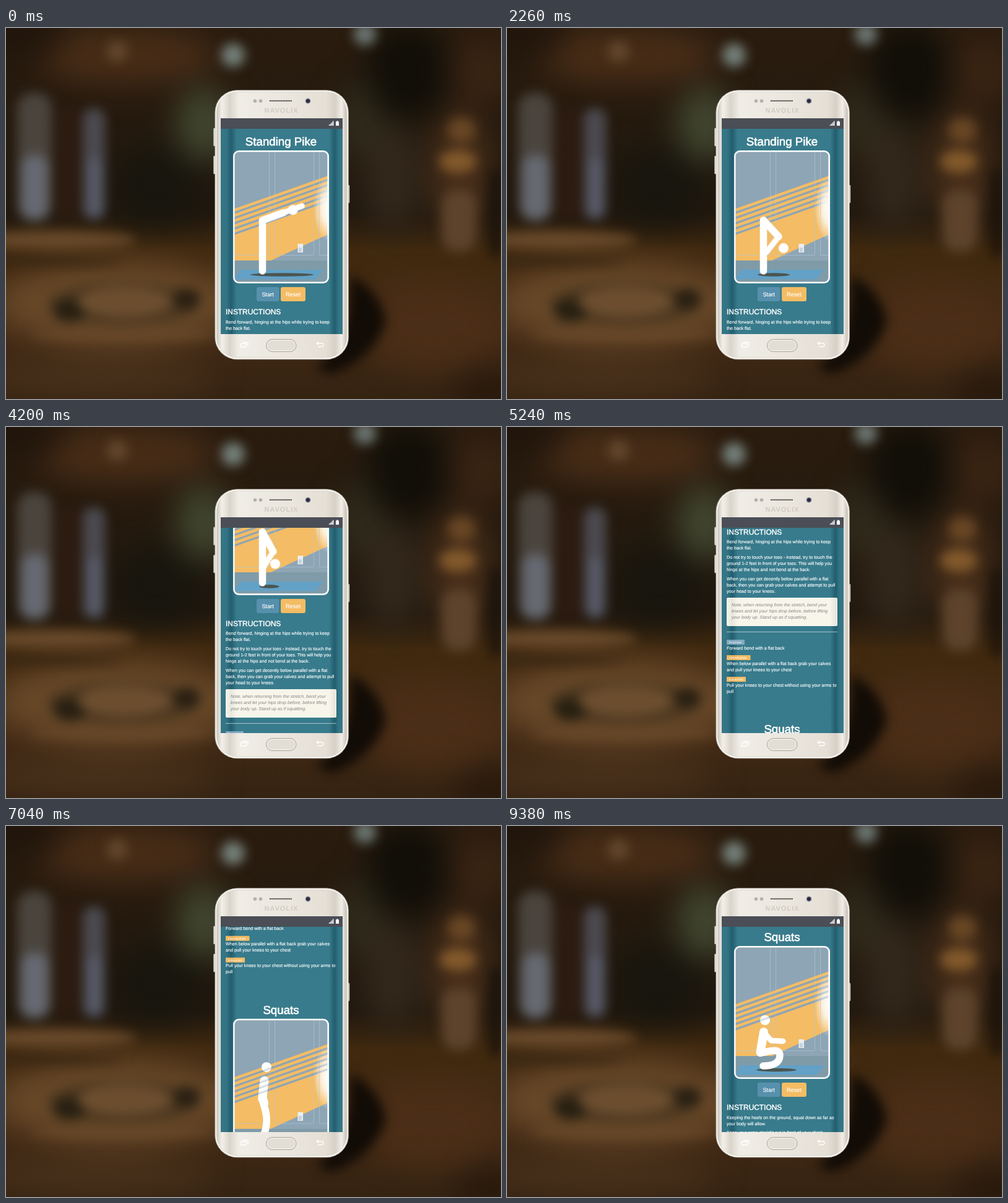
Write an HTML page that moves like this. It is 800x600 px and loops after 9420 ms.

```html
<!DOCTYPE html>
<html lang="en">
<head>
<meta charset="utf-8">
<title>Stretching app on a phone</title>
<style>
html, body { margin: 0; width: 100%; height: 100%; overflow: hidden; background: #2b1c0f; }
svg { display: block; width: 800px; height: 600px; }
text { font-family: "Liberation Sans", Arial, sans-serif; fill: #fff; text-rendering: geometricPrecision; }
.title { font-size: 18.7px; text-anchor: middle; stroke: #fff; stroke-width: .65; }
.heading { font-size: 11.9px; stroke: #fff; stroke-width: .45; }
.copy text { font-size: 7.17px; stroke: #fff; stroke-width: .15; }
.copy .note { font-style: italic; fill: #858580; stroke: none; }
.copy .badge { font-size: 5.2px; stroke: none; }
.button { font-size: 9.2px; text-anchor: middle; stroke: #fff; stroke-width: .15; }
.limb { fill: none; stroke: #fff; stroke-width: 11.5; stroke-linecap: round; stroke-linejoin: round; }
.arm { stroke-width: 9; }
.back { stroke-width: 14; }
.shadow { fill: #4b5552; }

.page, .turn, .shadow, .squat * { animation: 9420ms linear infinite; }
.page { animation-name: scroll; }
.torso { animation-name: bend; }
.reach { animation-name: reach; }
.nod { animation-name: nod; }
.pike-shadow { animation-name: pike-shadow; }
.squat-shadow { animation-name: squat-shadow; }
.squat .head { animation-name: squat-head; }
.squat .back { animation-name: squat-back; }
.squat .arm { animation-name: squat-arm; }
.squat .leg { animation-name: squat-leg; }

@keyframes scroll {
  0%, 31.5% { transform: translateY(0); }
  44.59% { transform: translateY(-141px); }
  55.63% { transform: translateY(-289px); }
  66.45% { transform: translateY(-398px); }
  84.29%, 85.14% { transform: translateY(-575px); }
  89.5%, 100% { transform: translateY(-598px); }
}
@keyframes bend {
  0% { transform: rotate(-20deg); }
  10.4% { transform: rotate(-2deg); }
  24% { transform: rotate(47deg); }
  31%, 100% { transform: rotate(61deg); }
}
@keyframes reach {
  0% { transform: rotate(0deg); }
  10.4% { transform: rotate(42deg); }
  24% { transform: rotate(81deg); }
  31%, 100% { transform: rotate(61deg); }
}
@keyframes nod {
  0% { transform: translate(52px, 1px); }
  24%, 100% { transform: translate(55px, 7px); }
}
@keyframes pike-shadow {
  0% { cx: 446px; rx: 51px; }
  10.4% { cx: 442px; rx: 44px; }
  24% { cx: 431px; rx: 26px; }
  31%, 100% { cx: 425.5px; rx: 16px; }
}
@keyframes squat-shadow {
  0%, 66.45% { cx: 427px; rx: 18px; }
  84.29%, 85.14% { cx: 429px; rx: 21px; }
  99.58%, 100% { cx: 435.5px; rx: 32.5px; }
}
@keyframes squat-head {
  0%, 66.45% { cx: 427px; cy: 272px; }
  84.29%, 85.14% { cx: 414px; cy: 281px; }
  93.42% { cx: 414px; cy: 291px; }
  99.58%, 100% { cx: 417px; cy: 318px; }
}
@keyframes squat-back {
  0%, 66.45% { d: path("M421 294L416 325"); }
  84.29%, 85.14% { d: path("M413.5 302L412 331"); }
  93.42% { d: path("M413 310L410 342"); }
  99.58%, 100% { d: path("M415 337L409.5 370"); }
}
@keyframes squat-arm {
  0%, 66.45% { d: path("M420 297L417 318L416 332"); }
  84.29%, 85.14% { d: path("M413 303L416 328L424 339"); }
  93.42% { d: path("M413 312L419 333L435 344"); }
  99.58%, 100% { d: path("M415 338L427 351L446 352"); }
}
@keyframes squat-leg {
  0%, 66.45% { d: path("M416 325C418 339 419 349 419 360C419 372 417 384 413 393"); }
  84.29%, 85.14% { d: path("M411 331C418 343 424 352 424 364C424 376 420 384 413 393"); }
  93.42% { d: path("M410 342C420 349 430 356 430 369C430 381 423 387 413 392"); }
  99.58%, 100% { d: path("M409 371C420 370 441 361 441 375C441 388 428 392 414 392"); }
}
</style>
</head>
<body>
<svg viewBox="0 0 800 600">
  <defs>
    <filter id="soft" filterUnits="userSpaceOnUse" x="-100" y="-100" width="1000" height="800" color-interpolation-filters="sRGB"><feGaussianBlur stdDeviation="9"/></filter>
    <filter id="haze" filterUnits="userSpaceOnUse" x="-200" y="-200" width="1200" height="1000" color-interpolation-filters="sRGB"><feGaussianBlur stdDeviation="24"/></filter>
    <linearGradient id="room" x2="0" y2="1">
      <stop offset="0" stop-color="#2a1c0f"/><stop offset=".5" stop-color="#21180e"/>
      <stop offset=".6" stop-color="#40290f"/><stop offset=".8" stop-color="#432a15"/>
      <stop offset="1" stop-color="#352312"/>
    </linearGradient>
    <linearGradient id="shell">
      <stop offset="0" stop-color="#cbc6bc"/><stop offset=".04" stop-color="#f3f0e9"/>
      <stop offset=".1" stop-color="#dad5cb"/><stop offset=".17" stop-color="#f0ede6"/>
      <stop offset=".5" stop-color="#ebe7df"/><stop offset=".84" stop-color="#e5dfd5"/>
      <stop offset=".91" stop-color="#d6d0c6"/><stop offset=".96" stop-color="#f1eee7"/>
      <stop offset="1" stop-color="#c5bfb5"/>
    </linearGradient>
    <linearGradient id="curve">
      <stop offset="0" stop-color="#003040" stop-opacity=".04"/>
      <stop offset=".05" stop-color="#003040" stop-opacity=".08"/>
      <stop offset=".085" stop-color="#003040" stop-opacity=".34"/>
      <stop offset=".13" stop-color="#003040" stop-opacity="0"/>
      <stop offset=".89" stop-color="#003040" stop-opacity="0"/>
      <stop offset=".935" stop-color="#003040" stop-opacity=".34"/>
      <stop offset=".965" stop-color="#003040" stop-opacity=".08"/>
      <stop offset="1" stop-color="#003040" stop-opacity=".04"/>
    </linearGradient>
    <radialGradient id="glow">
      <stop offset="0" stop-color="#fff"/><stop offset=".45" stop-color="#fff" stop-opacity=".8"/>
      <stop offset="1" stop-color="#fff" stop-opacity="0"/>
    </radialGradient>
    <clipPath id="view"><path d="M347 163H544V495H347z"/></clipPath>
    <clipPath id="frame"><rect x="368" y="199" width="153" height="213" rx="8"/></clipPath>

    <path id="stripe" d="M366 299.9L524 244.2"/>
    <g id="stripes" fill="none" stroke="#8ea5b5" stroke-width="3.2">
      <use href="#stripe"/><use href="#stripe" y="8.5"/><use href="#stripe" y="17"/>
      <use href="#stripe" y="25.5"/><use href="#stripe" y="34"/>
    </g>
    <g id="gym">
      <path d="M367 198H522V413H367z" fill="#8ea5b5"/>
      <path d="M367 376H522V413H367z" fill="#809ba8"/>
      <path d="M367 293.1L522 238.3V333L428 376H367z" fill="#f4bc64"/>
      <use href="#stripes"/>
      <ellipse cx="521" cy="292" rx="24" ry="53" fill="url(#glow)"/>
      <path d="M425.5 200V367M434.5 200V367M497.5 200V367M506.5 200V367M369 367.5H425M434 367.5H497M506 367.5H521" fill="none" stroke="#a9cbdc" stroke-width=".8" opacity=".75"/>
      <path d="M471.5 349H480V363H471.5z" fill="#e9eef0"/>
      <path d="M473 355H478V362H473z" fill="#c5d3dc"/>
      <path d="M378 391H513L500 406.5H369z" fill="#63a1c6"/>
    </g>
    <g id="controls">
      <rect x="368.3" y="199.3" width="152.4" height="212.4" rx="8" fill="none" stroke="#fff" stroke-width="2.6"/>
      <rect x="405" y="419" width="36.5" height="23" rx="3" fill="#5790ad"/>
      <rect x="444" y="419" width="40" height="23" rx="3" fill="#f4bc64"/>
      <text class="button" x="423.2" y="433.6">Start</text>
      <text class="button" x="464" y="433.6">Reset</text>
      <text class="heading" x="355" y="462.8">INSTRUCTIONS</text>
    </g>
  </defs>

  <path d="M0 0H800V600H0z" fill="url(#room)"/>
  <g filter="url(#haze)">
    <ellipse cx="190" cy="45" rx="150" ry="45" fill="#482d17"/>
    <ellipse cx="15" cy="10" rx="80" ry="50" fill="#22160c"/>
    <ellipse cx="320" cy="155" rx="45" ry="60" fill="#414630"/>
    <ellipse cx="245" cy="255" rx="75" ry="65" fill="#18160e"/>
    <ellipse cx="570" cy="150" rx="35" ry="60" fill="#2f2b1c"/>
    <ellipse cx="650" cy="70" rx="65" ry="80" fill="#110f08"/>
    <ellipse cx="770" cy="70" rx="50" ry="50" fill="#3a2413"/>
    <ellipse cx="625" cy="240" rx="45" ry="90" fill="#33281c"/>
    <ellipse cx="735" cy="230" rx="45" ry="100" fill="#4a301b"/>
    <ellipse cx="180" cy="445" rx="200" ry="70" fill="#674828"/>
    <ellipse cx="690" cy="480" rx="120" ry="70" fill="#4b2e17"/>
    <ellipse cx="150" cy="565" rx="190" ry="28" fill="#4a321c"/>
    <ellipse cx="790" cy="590" rx="70" ry="40" fill="#291a0d"/>
  </g>
  <g filter="url(#soft)">
    <rect x="18" y="105" width="56" height="208" rx="24" fill="#4a443d"/>
    <rect x="25" y="205" width="43" height="104" rx="20" fill="#666972"/>
    <path d="M80 125H120V310H80z" fill="#2c1b10"/>
    <rect x="124" y="130" width="36" height="180" rx="16" fill="#4c4a50"/>
    <rect x="132" y="210" width="22" height="95" rx="10" fill="#575b69"/>
    <circle cx="367" cy="44" r="19" fill="#74807a"/>
    <circle cx="580" cy="10" r="18" fill="#6b7672"/>
    <circle cx="180" cy="38" r="17" fill="#62472d"/>
    <ellipse cx="736" cy="165" rx="22" ry="20" fill="#684624"/>
    <ellipse cx="730" cy="216" rx="30" ry="18" fill="#82592b"/>
    <rect x="704" y="262" width="56" height="100" rx="24" fill="#5d432c"/>
    <path d="M783 230H800V370H783z" fill="#1b120a"/>
    <ellipse cx="80" cy="343" rx="130" ry="15" fill="#68492a"/>
    <ellipse cx="60" cy="378" rx="130" ry="7" fill="#3a2714"/>
    <ellipse cx="190" cy="446" rx="122" ry="34" fill="#4b371f"/>
    <ellipse cx="103" cy="457" rx="27" ry="19" fill="#282012"/>
    <ellipse cx="292" cy="438" rx="22" ry="17" fill="#2a2013"/>
    <ellipse cx="192" cy="443" rx="76" ry="25" fill="#6c4e2f"/>
    <ellipse cx="190" cy="494" rx="150" ry="12" fill="#664728"/>
    <path d="M556 400Q606 425 614 475Q595 535 525 560L500 548Q560 510 556 400" fill="#120c06"/>
  </g>

  <g fill="#eeeae2" stroke="#a9a49b" stroke-width=".5">
    <rect x="335.5" y="162" width="4" height="29" rx="1"/>
    <rect x="335.5" y="207" width="4" height="29" rx="1"/>
    <rect x="551.5" y="254" width="3.5" height="29" rx="1"/>
  </g>
  <rect x="337.5" y="100.3" width="216.3" height="436" rx="36" fill="#b8b3aa"/>
  <rect x="338.5" y="101.3" width="214.3" height="434" rx="35" fill="#faf8f3"/>
  <rect x="340.5" y="103.5" width="210.3" height="429.5" rx="33" fill="url(#shell)" stroke="#cfcac1" stroke-width=".6"/>
  <g fill="#b4b0aa"><circle cx="402.5" cy="118" r="2.8"/><circle cx="411.5" cy="118" r="2.8"/></g>
  <path d="M427 117.8H463" stroke="#413e3a" stroke-width="2.3" stroke-linecap="round" stroke-dasharray="0 2.6"/>
  <circle cx="488" cy="118" r="4.3" fill="#777480"/><circle cx="488" cy="118" r="2.8" fill="#252743"/>
  <text x="445" y="137" text-anchor="middle" font-size="11" font-weight="700" letter-spacing="1" style="fill:#d0cbc2">NAVOLIX</text>
  <rect x="420.5" y="503.5" width="48.5" height="20" rx="10" fill="#e3ded5" stroke="#aaa59c"/>
  <rect x="422" y="505" width="45.5" height="17" rx="8.5" fill="none" stroke="#f7f4ee"/>
  <g fill="none" stroke="#fff" stroke-width="1.4">
    <rect x="379.5" y="510.5" width="9" height="5.5" rx="1"/><path d="M382 508.5H391V514"/>
    <path d="M505 507.5L502.5 510H511Q513 510 513 512.5T511 515.5H504M502.5 510L505 512.5"/>
  </g>

  <path d="M347 146H544V495H347z" fill="#387b8c"/>
  <path d="M347 163H544V495H347z" fill="url(#curve)"/>
  <g clip-path="url(#view)">
    <g class="page">
      <text class="title" x="444.5" y="190.3">Standing Pike</text>
      <g clip-path="url(#frame)">
        <use href="#gym"/>
        <ellipse class="shadow pike-shadow" cy="399" ry="2.8"/>
        <path class="limb" d="M414.5 311V393"/>
        <g transform="translate(414.5 311)">
          <g class="turn torso">
            <path class="limb" d="M0 0H36"/>
            <circle class="turn nod" r="8" fill="#fff"/>
            <g transform="translate(36 0)"><path class="limb arm turn reach" d="M0 0H32"/></g>
          </g>
        </g>
      </g>
      <use href="#controls"/>
      <g class="copy">
        <text x="355" y="477.5">Bend forward, hinging at the hips while trying to keep</text>
        <text x="355" y="487.5">the back flat.</text>
        <text x="355" y="502">Do not try to touch your toes - instead, try to touch the</text>
        <text x="355" y="512">ground 1-2 feet in front of your toes. This will help you</text>
        <text x="355" y="522">hinge at the hips and not bend at the back.</text>
        <text x="355" y="537">When you can get decently below parallel with a flat</text>
        <text x="355" y="547">back, then you can grab your calves and attempt to pull</text>
        <text x="355" y="557">your head to your knees.</text>
        <rect x="355" y="565" width="179" height="46" rx="2" fill="#f8f5eb"/>
        <text class="note" x="363" y="579.5">Note, when returning from the stretch, bend your</text>
        <text class="note" x="363" y="589.5">knees and let your hips drop before, before lifting</text>
        <text class="note" x="363" y="599.5">your body up. Stand up as if squatting.</text>
        <path d="M355 620.5H534" stroke="#b9d0d6" stroke-width=".9"/>
        <rect x="355" y="633" width="29" height="8" rx="1" fill="#83abc3"/>
        <text class="badge" x="358.5" y="638.9">Beginner</text>
        <text x="355" y="648.7">Forward bend with a flat back</text>
        <rect x="355" y="658" width="38.5" height="8" rx="1" fill="#f4bc64"/>
        <text class="badge" x="358.5" y="663.9">Intermediate</text>
        <text x="355" y="673.7">When below parallel with a flat back grab your calves</text>
        <text x="355" y="683.7">and pull your knees to your chest</text>
        <rect x="355" y="693" width="31" height="8" rx="1" fill="#f4bc64"/>
        <text class="badge" x="358.5" y="698.9">Advanced</text>
        <text x="355" y="708.7">Pull your knees to your chest without using your arms to</text>
        <text x="355" y="718.7">pull</text>
      </g>

      <g transform="translate(0 594)">
        <text class="title" x="444.5" y="190.3">Squats</text>
        <g clip-path="url(#frame)">
          <use href="#gym"/>
          <ellipse class="shadow squat-shadow" cy="398.5" ry="2.8"/>
          <g class="squat">
            <circle class="head" r="8" fill="#fff"/>
            <path class="limb back"/>
            <path class="limb leg"/>
            <path class="limb arm"/>
          </g>
          <use href="#stripes" opacity=".35"/>
        </g>
        <use href="#controls"/>
        <g class="copy">
          <text x="355" y="477.5">Keeping the heels on the ground, squat down as far as</text>
          <text x="355" y="487.5">your body will allow.</text>
          <text x="355" y="502">Keep your arms straight out in front of your chest.</text>
        </g>
      </g>
    </g>
  </g>
  <path d="M347 163H544V495H347z" fill="url(#curve)" opacity=".2"/>
  <path d="M347 146H544V163H347z" fill="#4b4e56"/>
  <g fill="#fff">
    <path d="M522 156H523.4V158H522zM524 154.5H525.4V158H524zM526 152.5H527.4V158H526zM528 150.5H529.4V158H528z"/>
    <path d="M533 151.5H534.4V150.3H536.6V151.5H538V158H533z"/>
  </g>
</svg>
</body>
</html>
```
